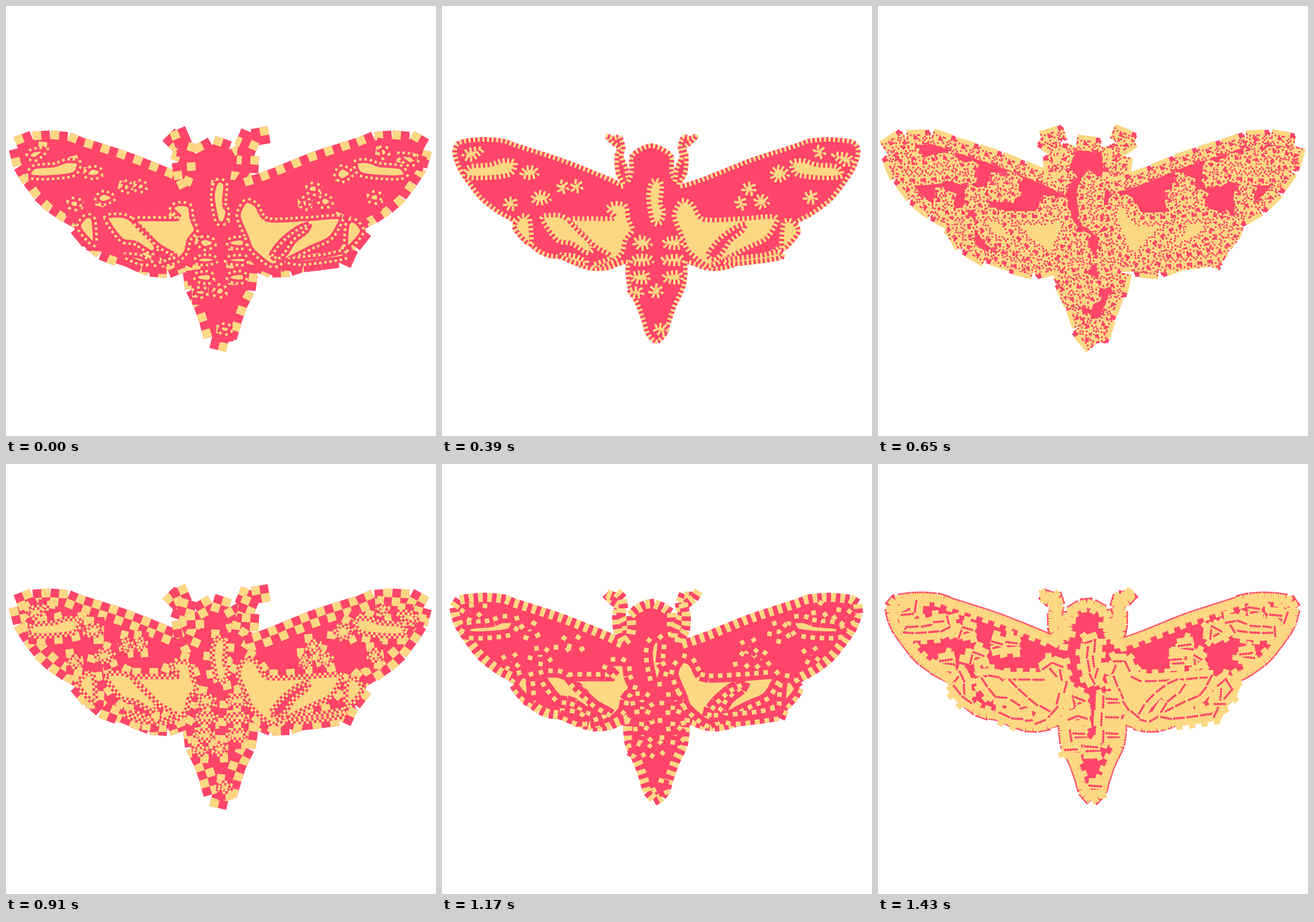
An HTML page with a canvas that plays this animation: 748 px wide and 748 px high, repeating every 1.56 s.

```html
<!DOCTYPE html>
<html lang="en">
<head>
<meta charset="utf-8">
<title>Moth</title>
<style>
  html, body { margin: 0; width: 100%; height: 100%; overflow: hidden; background: #fff; }
  canvas { display: block; width: 100vmin; height: 100vmin; }
</style>
</head>
<body>
<canvas id="stage" width="748" height="748"></canvas>
<script>
const RED = '#ff456a', YELLOW = '#fdd882';
const STEP = 130;
const ctx = document.getElementById('stage').getContext('2d');

// ---- shapes ----

const points = text => text.trim().split(/\s+/).map(s => s.split(',').map(Number));
const mirror = (pts, axis) => pts.map(([x, y]) => [2 * axis - x, y]).reverse();

// Closed smooth curve through the points.
function blob(p, hole = false) {
  const n = p.length, at = i => p[(i + n) % n], k = 7;
  let d = `M${p[0]}`, area = 0;
  for (let i = 0; i < n; i++) {
    const [a, b, c, e] = [at(i - 1), at(i), at(i + 1), at(i + 2)];
    d += `C${b[0] + (c[0] - a[0]) / k},${b[1] + (c[1] - a[1]) / k} ` +
         `${c[0] - (e[0] - b[0]) / k},${c[1] - (e[1] - b[1]) / k} ${c}`;
    area += b[0] * c[1] - c[0] * b[1];
  }
  const el = document.createElementNS('http://www.w3.org/2000/svg', 'path');
  el.setAttribute('d', d + 'Z');
  return { el, hole, fill: new Path2D(d + 'Z'), len: el.getTotalLength(), side: Math.sign(area) };
}

// Slightly uneven oval.
function spot(x, y, rx, ry = rx) {
  return blob(Array.from({ length: 7 }, (_, i) => {
    const a = i / 7 * Math.PI * 2, r = 1 + 0.12 * Math.sin(i * 2.3 + x);
    return [x + Math.cos(a) * rx * r, y + Math.sin(a) * ry * r];
  }));
}

// Left half of the body; the right half is its mirror image.
const AXIS = 373, HEAD_AXIS = 364.5;
const wing = points('132,379 122,371 100,359 70,336 46,306 30,281 22,253 32,237 72,232 108,235 ' +
  '130,243 210,269 290,301');
const head = points('316,313 306,290 304,262 308,247 297,238 286,226 299,230 309,228 315,245 ' +
  '312,262 321,284 324,304 330,287 330,262 346,249');
const tail = points('358,570 351,548 341,520 327,490 323,464 322,446');
const hind = points('308,448 290,455 266,457 240,451 210,438 185,434 165,424 142,402');

const outline = blob([
  ...wing, ...head, [364, 243], ...mirror(head, HEAD_AXIS), ...mirror(wing, AXIS),
  ...mirror(hind, AXIS), ...mirror(tail, AXIS), [AXIS, 584], ...tail, ...hind
]);

const bar = points('40,296 48,280 84,276 106,269 127,272 118,293 70,299');
const tip = points('38,262 46,251 70,249 62,259 50,267');
const cell = points('126,384 138,366 152,370 155,413 143,407');

const patches = [
  blob(bar), blob(mirror(bar, 367.5)),
  blob(tip), blob(mirror(tip, 376).map(([x, y]) => [x, y + 9])),
  blob(cell), blob(mirror(cell, AXIS).map(([x, y]) => [x, y + 8])),
  // left hindwing
  blob(points('174,371 185,364 214,368 250,402 262,421 252,429 225,413 200,407')),
  blob(points('222,374 250,370 300,369 288,353 298,344 319,347 324,370 331,390 319,407 313,429 ' +
    '295,445 262,451 294,436 264,416')),
  blob(points('205,434 232,435 252,447 232,447')),
  // thorax
  blob(points('362,313 370,303 382,310 380,344 386,358 380,377 367,375 359,335')),
  // right hindwing
  blob(points('404,367 410,347 420,338 436,346 455,371 520,370 580,367 577,386 562,406 530,421 ' +
    '480,446 460,451 428,425 418,402')),
  blob(points('527,379 522,392 501,409 486,431 473,441 462,432 480,408 505,388'), true),
  blob(points('490,442 555,434 584,428 588,438 515,448')),
  // forewing spots
  ...points('152,290,13,9 587,292,14,11 172,334,15,9 556,340,11,9 210,315,8 234,314,8 119,344,9 ' +
    '641,333,9 657,254,8 534,318,9 520,343,7,9 372,496,9 381,562,11,7').map(s => spot(...s))
];
// Abdomen bands, in rows.
for (let row = 0; row < 3; row++) {
  const wide = row === 1 ? 18 : 15, high = row === 1 ? 7 : 9, y = 412 + row * 30;
  patches.push(spot(349 - row * 2, y, wide, high), spot(402, y, wide, high));
}
patches.push(spot(338, 498, 11, 7));

// ---- border tiles: x runs along the edge, negative y is outside ----

function tile(width, draw) {
  const layers = [];
  draw((colour, x, y, w, h) => {
    let last = layers[layers.length - 1];
    if (!last || last.colour !== colour) layers.push(last = { colour, path: new Path2D() });
    last.path.rect(x, y, w, h);
  });
  return { width, layers };
}

const dots = s => tile(s, r => {
  r(RED, -s / 2, -s / 2, s, s);
  r(YELLOW, -s / 2, -s / 2, s / 2, s / 2);
});

const check = s => tile(s, r => {
  r(RED, -s / 2, -s / 2, s, s);
  r(YELLOW, 0, -s / 2, s / 2, s / 2);
  r(YELLOW, -s / 2, 0, s / 2, s / 2);
});

const stripe = s => tile(s, r => {
  r(YELLOW, -s / 2, -s / 2, s / 2, s);
  r(RED, 0, -s / 2, s / 2, s);
});

const split = s => tile(s, r => {
  r(YELLOW, -s / 2, -s / 2, s, s / 2);
  r(RED, -s / 2, 0, s, s / 2);
});

// Speckles from y = -out to y = into, with an optional plain rim.
function noise(width, out, into, rim) {
  return tile(width, r => {
    let seed = 7;
    const rand = () => (seed = seed * 16807 % 2147483647) / 2147483647;
    const c = 3, left = -width / 2;
    r(YELLOW, left, -out + rim, width, out + into - rim);
    if (rim) {
      r(YELLOW, left, -out, width * 0.76, rim);
      r(RED, width * 0.27, -out + 1, width * 0.18, rim + 3);
    }
    for (let x = left; x < width / 2; x += c) {
      for (let y = -out + rim; y < into; y += c) if (rand() < 0.36) r(RED, x, y, c, c);
    }
  });
}

// Battlements inside a thin red rim, and the fine toothed band over them.
const rampart = tile(22, r => {
  r(RED, -11, -10, 22, 10);
  r(YELLOW, -11, 0, 11, 15);
});
const band = tile(12, r => {
  r(YELLOW, -6, -7, 12, 14);
  for (let x = -6; x < 6; x += 4) r(YELLOW, x, -8.5, 2, 17);
});
const comb = tile(24, r => {
  r(YELLOW, -12, -8, 24, 18);
  r(RED, -12, 4, 21, 2.5);
  for (let x = -11; x < 9; x += 4) r(RED, x, 3, 2, 4.5);
});

// Per step: tiles on the red shape's edges, then tiles on the yellow patches.
const steps = [
  [[dots(30)], [dots(9)]],
  [[stripe(16)], [dots(16)]],
  [[stripe(8)], [split(22)]],
  [[stripe(8)], [stripe(8)]],
  [[stripe(16)], [stripe(16)]],
  [[noise(42, 17, 10, 5)], [noise(18, 13, 9, 0)]],
  [[check(30)], [stripe(16)]],
  [[check(30)], [check(9)]],
  [[stripe(16)], [check(16)]],
  [[stripe(16)], [dots(16)]],
  [[split(44)], [split(9)]],
  [[rampart, band], [comb]]
];

// ---- drawing ----

function border(shape, t, flip) {
  const n = Math.max(1, Math.round(shape.len / t.width)), gap = shape.len / n;
  const point = s => shape.el.getPointAtLength((s + shape.len) % shape.len);
  for (let i = 0; i < n; i++) {
    const s = (i + 0.5) * gap, p = point(s), a = point(s - 2), b = point(s + 2);
    ctx.save();
    ctx.translate(p.x, p.y);
    ctx.rotate(Math.atan2(b.y - a.y, b.x - a.x));
    ctx.scale(gap / t.width, shape.side * (flip ? -1 : 1));
    for (const { colour, path } of t.layers) {
      ctx.fillStyle = colour;
      ctx.fill(path);
    }
    ctx.restore();
  }
}

function paint(shape, colour) {
  ctx.fillStyle = colour;
  ctx.fill(shape.fill);
}

function draw([base, top]) {
  ctx.fillStyle = '#fff';
  ctx.fillRect(0, 0, 748, 748);
  paint(outline, RED);
  for (const t of base) {
    border(outline, t, false);
    for (const p of patches) border(p, t, !p.hole);
  }
  for (const p of patches) paint(p, p.hole ? RED : YELLOW);
  for (const t of top) for (const p of patches) border(p, t, p.hole);
}

// Each step is rendered once and kept.
const cache = steps.map(s => {
  draw(s);
  const copy = document.createElement('canvas');
  copy.width = copy.height = 748;
  copy.getContext('2d').drawImage(ctx.canvas, 0, 0);
  return copy;
});

const start = performance.now();
function frame() {
  const i = Math.floor((performance.now() - start) / STEP) % steps.length;
  ctx.drawImage(cache[i], 0, 0);
  requestAnimationFrame(frame);
}
frame();
</script>
</body>
</html>
```
